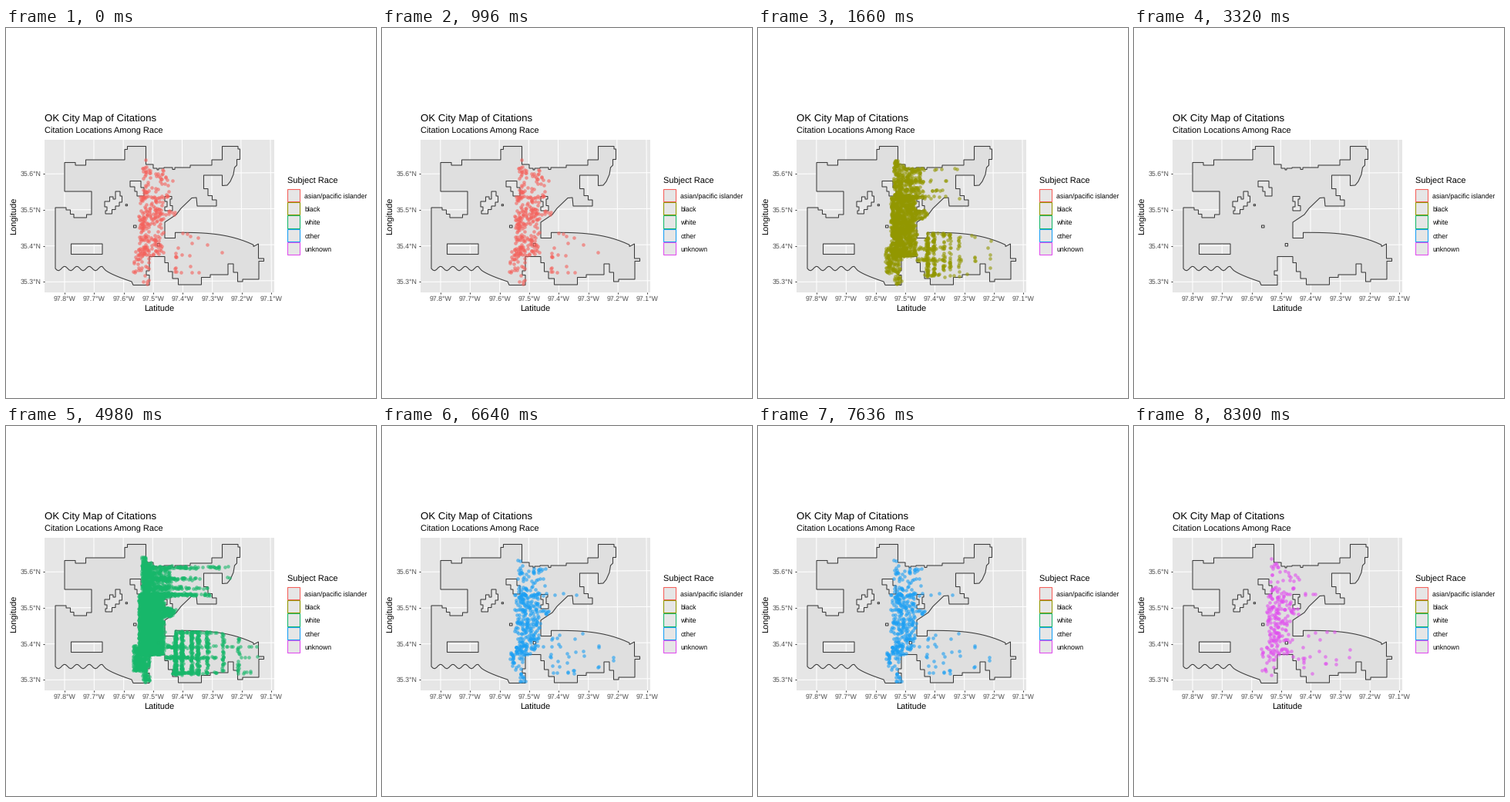
Recreate the animation shown at these times as a matplotlib script. Size 480 by 480 pixels, loop 9960 ms.

```python
import matplotlib.pyplot as plt
import numpy as np
from matplotlib.animation import FuncAnimation
from matplotlib.patches import PathPatch, Rectangle
from matplotlib.path import Path

SIZE, DPI, HOLD = 480, 72, 1660
LEFT, RIGHT, TOP, BOTTOM = 50.4, 348, 145, 342.6
PANEL, LAND, INK, MUTED = "#e6e6e6", "#dfdfdf", "#3c3c3c", "#4d4d4d"
LINE = 1.07

plt.rcParams["font.family"] = "Liberation Sans"
plt.rcParams["text.hinting"] = "none"


def stairs(x, y, *stops):
    """Walk from (x, y), alternately across to an x and along to a y."""
    points = [(x, y)]
    for i, stop in enumerate(stops):
        x, y = (x, stop) if i % 2 else (stop, y)
        points.append((x, y))
    return points


def river_bank():
    x = np.linspace(219.5, 321, 16)
    return list(zip(x, 265.3 + 16 * ((x - 219.5) / 101.5) ** 3))


def south_bank():
    x = np.linspace(163, 64, 45)
    slope = 17 * np.clip((x - 127) / 36, 0, 1) ** 0.7
    bends = 2.8 * np.sin((x - 80) * np.pi / 8) * (x < 126)
    return list(zip(x, 312 + slope + bends))


def closed(points):
    return Path(points + points[:1], closed=True)


border = closed(
    stairs(76, 174.5, 90, 178, 103.5, 171, 154, 157.5, 157.5, 153.5, 181.5,
           177, 191, 182, 196, 184, 198, 182, 205, 181, 216, 183.5, 219, 181,
           239, 178, 267, 171, 280.5, 153.5, 301, 157, 303.5, 170.5, 299.5,
           178)
    + [(296.5, 181), (295, 190), (291, 199), (287, 204), (280.5, 204.5)]
    + stairs(280.5, 191, 256.5, 208.5, 262, 217.5, 267.5, 223, 273, 231, 248)
    + [(247, 220), (241, 220.5), (227, 234), (221, 242), (206, 252)]
    + stairs(206, 272.5, 219.5)
    + river_bank()
    + [(321, 283.5), (327.5, 280)]
    + stairs(327.5, 299, 334.5, 302.5, 328, 326, 307, 329, 300.5, 317, 295,
             306, 288, 320, 265, 323.5, 253.5, 333, 223.5, 325, 216, 316,
             210.5, 304.5, 206, 296.5, 186, 315, 182, 320.5, 186, 333.5, 165)
    + south_bank()
    + stairs(64, 233, 78, 236, 83.5, 241.5, 88, 246, 104.5, 242, 111, 212, 76)
)
holes = [closed(stairs(*walk)[::-1]) for walk in (
    (84.5, 280, 125, 293.5, 84.5),
    (145, 212, 148, 218, 150.5, 226, 147, 231, 142, 235.5, 137.5, 241, 129,
     237, 131, 232, 128, 225, 134.5, 219, 139, 222, 142, 212),
    (161, 198.5, 175, 207, 179, 218, 170, 212, 167, 206, 161),
    (206, 218.5, 215, 222, 213, 230.5, 216, 237, 206, 232, 209, 225, 206),
    (165.5, 256, 169, 259, 165.5),
    (196.2, 279.5, 199.5, 283, 196.2),
    (155.2, 228.7, 157.5, 230.7, 155.2),
)]

# Town districts: weight, x range, y range
districts = np.array([
    (58, 172, 205, 218, 297),
    (11, 176, 189, 170, 222),
    (6, 189, 214, 182, 222),
    (10, 165, 186, 285, 318),
    (2, 177, 186, 315, 332),
    (3, 203, 220, 236, 247),
])
streets = np.array([219.5, 228, 240.5, 249, 261, 281, 301])
north_roads = [183, 198, 210, 218.5, 218.5]
south_roads = [267, 286, 300, 320]

# Name, colour, dots, share out in the east, how far east they reach
groups = [
    ("asian/pacific islander", "#f5605a", 330, 0.10, 20),
    ("black", "#929700", 2000, 0.22, 24),
    ("white", "#17b76a", 4200, 0.30, 55),
    ("other", "#1a9ff4", 420, 0.12, 40),
    ("unknown", "#e14eef", 260, 0.12, 30),
]
# The third slot of the cycle shows the bare map
order = [0, 1, None, 2, 3, 4]


def in_town(rng, n):
    weight, x0, x1, y0, y1 = districts.T
    k = rng.choice(len(districts), n, p=weight / weight.sum())
    return np.column_stack([x0[k] + (x1 - x0)[k] * rng.beta(1.1, 1.3, n),
                            rng.uniform(y0[k], y1[k])])


def out_east(rng, n, reach):
    """Dots along the streets and roads, thinning out eastwards."""
    fade = np.exp(-(streets - streets[0]) / reach)
    along_street = np.column_stack([
        rng.choice(streets, n, p=fade / fade.sum()), rng.uniform(266, 322, n)])
    north = np.column_stack([190 + rng.exponential(reach * 0.7, n),
                             rng.choice(north_roads, n)])
    south = np.column_stack([206 + rng.exponential(reach * 0.7, n),
                             rng.choice(south_roads, n)])
    kind = rng.choice(3, n, p=[0.45, 0.35, 0.2])
    points = np.stack([along_street, north, south])[kind, np.arange(n)]
    return points + rng.normal(0, 0.9, (n, 2))


def scatter_group(seed, n, share, reach):
    rng = np.random.default_rng(seed)
    east = int(n * share)
    points = np.concatenate([in_town(rng, n - east),
                             out_east(rng, east, reach)])
    return points[border.contains_points(points)]


def label(x, y, text, size, color="black", **kw):
    ax.text(x, y, text, fontsize=size, color=color, va="baseline", **kw)


fig = plt.figure(figsize=(SIZE / DPI, SIZE / DPI), dpi=DPI, facecolor="white")
ax = fig.add_axes([0, 0, 1, 1])
ax.set_xlim(0, SIZE)
ax.set_ylim(SIZE, 0)
ax.axis("off")

panel = Rectangle((LEFT, TOP), RIGHT - LEFT, BOTTOM - TOP, fc=PANEL, lw=0)
ax.add_patch(panel)

for i in range(8):
    x = 76 + 38.35 * i
    ax.plot([x - 0.2 - 0.18 * i, x], [TOP, BOTTOM], color="white", lw=LINE,
            solid_capstyle="butt")
    ax.plot([x, x], [BOTTOM, BOTTOM + 2.7], color=INK, lw=LINE,
            solid_capstyle="butt")
    label(x, 354, f"{97.8 - 0.1 * i:.1f}°W", 8.8, MUTED, ha="center")

for i in range(4):
    y = 189.3 + 46.7 * i
    ax.plot([LEFT, RIGHT], [y, y - 1.6], color="white", lw=LINE,
            solid_capstyle="butt")
    ax.plot([LEFT - 2.7, LEFT], [y, y], color=INK, lw=LINE,
            solid_capstyle="butt")
    label(45.6, y + 2.8, f"{35.6 - 0.1 * i:.1f}°N", 8.8, MUTED, ha="right")

ax.add_patch(PathPatch(Path.make_compound_path(border, *holes), fc=LAND,
                       ec=INK, lw=LINE, zorder=3))

label(50.4, 121, "OK City Map of Citations", 13.2)
label(50.4, 137, "Citation Locations Among Race", 11)
label(199, 367.4, "Latitude", 11, ha="center")
label(13.5, 243.5, "Longitude", 11, ha="center", rotation=90,
      rotation_mode="anchor")
label(364.6, 202, "Subject Race", 11)

for i, (name, color, *_) in enumerate(groups):
    y = 216.9 + 17.28 * i
    ax.add_patch(Rectangle((365.2, y - 8.1), 16.2, 16.2, fc=PANEL, ec=color,
                           lw=LINE))
    label(387.3, y + 3.8, name, 8.8)

clouds = [scatter_group(7 + i, *g[2:]) for i, g in enumerate(groups)]
dots = ax.scatter([], [], s=21, linewidths=0, alpha=0.6, zorder=4)


def update(frame):
    k = order[frame]
    if k is None:
        dots.set_offsets(np.empty((0, 2)))
    else:
        dots.set_offsets(clouds[k])
        dots.set_facecolor(groups[k][1])
    return [dots]


anim = FuncAnimation(fig, update, frames=len(order), interval=HOLD,
                     repeat=True, repeat_delay=0)
plt.show()
```
